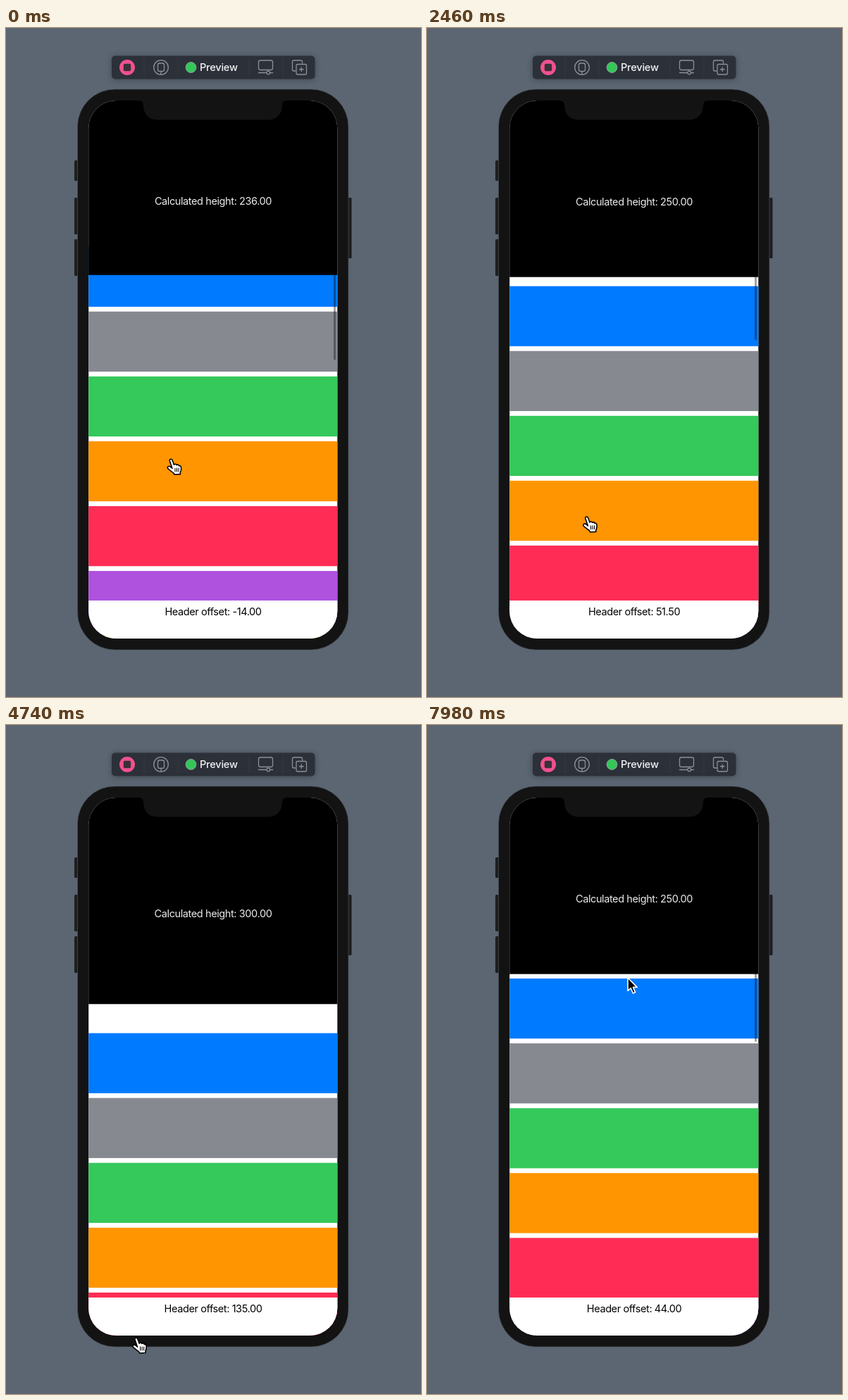
Recreate the animation shown at these times as an HTML page with a canvas. Size 589 px wide and 950 px high, loop 8 s.

```html
<!DOCTYPE html>
<html lang="en">
<head>
<meta charset="utf-8">
<title>Collapsing header</title>
<style>
  html, body { margin: 0; width: 100%; height: 100%; overflow: hidden; background: #5b6672; }
  canvas { display: block; width: 589px; height: 950px; }
</style>
</head>
<body>
<canvas id="stage"></canvas>
<script>
const canvas = document.getElementById('stage');
const ctx = canvas.getContext('2d');
const ratio = window.devicePixelRatio || 1;
canvas.width = 589 * ratio;
canvas.height = 950 * ratio;

const LOOP = 8000, STEP = 60;
const POINT = 764 / 896;               // pixels per device point
const SAFE_TOP = 140.5, FOOTER_TOP = 813, REST = 44;
const COLORS = ['#007aff', '#878991', '#35c85a', '#ff9500', '#ff2d55', '#af52de', '#ffcc00'];
const FONT = 'Inter, Roboto, sans-serif';

// Turning points of the gestures; everything between them is a sine ease
const TURNS = [
  { time: -127, offset: -3, x: 238, y: 632 },
  { time: 1080, offset: -407.5, x: 249, y: 287 },
  { time: 2293, offset: 60, x: 221, y: 709 },
  { time: 2620, offset: REST, x: 240, y: 700 },
  { time: 3363, offset: -260, x: 231, y: 391 },
  { time: 4488, offset: 135, x: 184, y: 854 },
  { time: 5160, offset: 135, x: 200, y: 940 },
  { time: 5600, offset: REST, x: 220, y: 700 },
  { time: 6127, offset: REST, x: 248, y: 400 },
  { time: 6480, offset: 206, x: 252, y: 840 },
  { time: 7140, offset: 206, x: 258, y: 935 },
  { time: 7560, offset: REST, x: 268, y: 700 },
  { time: 7980, offset: REST, x: 285, y: 359 }
];

function valueAt(t, key) {
  const next = TURNS.findIndex(turn => turn.time > t);
  if (next === 0) return TURNS[0][key];
  if (next < 0) return TURNS[TURNS.length - 1][key];
  const a = TURNS[next - 1], b = TURNS[next];
  const ease = (1 - Math.cos(Math.PI * (t - a.time) / (b.time - a.time))) / 2;
  return a[key] + (b[key] - a[key]) * ease;
}

function targetHeight(offset) {
  if (offset > 80) return 300;
  return Math.max(100, 250 + Math.min(0, offset));
}

// The header follows its target with an eased delay
function headerHeight(t) {
  let sum = 0, total = 0;
  for (let s = 0.02; s < 1; s += 0.04) {
    const weight = s * (1 - s);
    sum += weight * targetHeight(valueAt(t - s * 430, 'offset'));
    total += weight;
  }
  return sum / total;
}

function rect(x0, y0, x1, y1, color) {
  ctx.fillStyle = color;
  ctx.fillRect(x0, y0, x1 - x0, y1 - y0);
}

function rounded(x0, y0, x1, y1, radius) {
  ctx.beginPath();
  ctx.roundRect(x0, y0, x1 - x0, y1 - y0, radius);
}

function circle(x, y, r) {
  ctx.beginPath();
  ctx.arc(x, y, r, 0, Math.PI * 2);
}

function fill(color) { ctx.fillStyle = color; ctx.fill(); }

function stroke(color, width) {
  ctx.strokeStyle = color;
  ctx.lineWidth = width;
  ctx.stroke();
}

function text(string, x, y, color, { align = 'center', weight = 400, spacing = -0.4 } = {}) {
  ctx.font = `${weight} 14.5px ${FONT}`;
  ctx.letterSpacing = spacing + 'px';
  ctx.textAlign = align;
  ctx.fillStyle = color;
  ctx.fillText(string, x, y);
}

function drawToolbar() {
  const line = '#8c9098';
  ctx.save();
  ctx.shadowColor = 'rgba(0,0,0,.3)';
  ctx.shadowBlur = 8 * ratio;
  ctx.shadowOffsetY = ratio;
  rounded(150, 39.5, 438.5, 72.5, 5);
  fill('#2c3039');
  ctx.restore();
  for (const x of [196, 244, 345, 393]) rect(x - 0.5, 44, x + 0.5, 68, '#353942');

  circle(172, 56, 11);
  fill('#f1518f');
  rounded(166.8, 50.8, 177.2, 61.2, 2);
  fill('#3a3039');

  circle(220, 56, 10.3);
  stroke(line, 1.3);
  rounded(215.5, 50, 224.5, 61.5, 2.5);
  stroke(line, 1.3);
  ctx.stroke(new Path2D('M220 61.5V66'));

  circle(262.5, 56, 7.4);
  fill('#34c759');
  stroke('#8fa497', 1);
  text('Preview', 275, 61, '#f2f3f5', { align: 'left', weight: 500, spacing: -0.2 });

  rounded(358.5, 46, 378.5, 59.5, 2.5);
  stroke(line, 1.3);
  ctx.stroke(new Path2D('M358 63.5H369.5M375 63.5H379'));
  circle(372.2, 63.5, 2.3);
  stroke(line, 1.3);

  ctx.stroke(new Path2D('M411 61H408.5Q406.5 61 406.5 59V48Q406.5 46 408.5 46H418.5Q420.5 46 420.5 48V50.5'));
  rounded(412, 51.5, 426.5, 66, 2);
  fill('#2c3039');
  stroke(line, 1.3);
  ctx.stroke(new Path2D('M419.25 55.5V62M416 58.75H422.5'));
}

function drawBody() {
  for (const [x, y0, y1] of [[97, 188, 217], [97, 241, 293], [97, 300, 352], [484, 241, 327]]) {
    rounded(x, y0, x + 6.5, y1, 1.5);
    fill('#1d1e1f');
  }
  rounded(101.5, 87, 486, 883, 53);
  fill('#131313');
  stroke('#4d555d', 0.7);
}

function drawScreen(t, frame) {
  const offset = valueAt(t, 'offset');
  const pull = offset - REST;
  const headerBottom = SAFE_TOP + headerHeight(t) * POINT;
  const top = 360 + pull * POINT;

  ctx.save();
  rounded(117.2, 103, 470.3, 867, 39);
  ctx.clip();
  rect(117, 103, 471, 867, '#fff');
  for (let i = 0; i < 14; i++) {
    const y = top + i * 108 * POINT;
    rect(117, y, 471, y + 100 * POINT, COLORS[i % COLORS.length]);
  }

  const barBottom = 450 - pull * (pull > 0 ? POINT : 0.371);
  rounded(465, Math.min(barBottom - 7, Math.max(143, barBottom - 307)), 468, barBottom, 1.5);
  fill('rgba(0,0,0,.36)');

  rect(117, 103, 471, headerBottom, '#000');
  rect(117, FOOTER_TOP, 471, 867, '#fff');

  // Labels are sometimes refreshed a moment after the scroll view
  const stale = frame % 6 === 3 ? 16 : 0;
  const shown = Math.round(valueAt(t - stale, 'offset') * 2) / 2;
  text('Calculated height: ' + targetHeight(shown).toFixed(2), 294,
    (SAFE_TOP + headerBottom) / 2 + 5, '#ededed');
  text('Header offset: ' + shown.toFixed(2), 294, 834, '#000');

  ctx.fillStyle = '#131313';
  ctx.fill(new Path2D('M188 102V103Q195 103 195 110Q196 130.5 217 130.5H370Q391 130.5 392 110Q392 103 399 103V102Z'));
  ctx.restore();
}

const HAND = new Path2D('M-2.4 2.6L-5.9-7.6C-6.7-10.6-3.1-11.5-2.1-8.6L.2-2.4C.8-3.9 3.4-3.6 3.9-2.1C4.9-3.1 7-2.5 7.4-.9C8.7-1.5 10-.4 10.2 1.2C10.7 4.5 10.2 6.5 9 8.4V11L.6 11.4L-.4 9.2C-3.2 7.8-5.4 5.4-8.2 3.2C-10.4 .8-7.6-1.6-5 .4Z');
const PALM = new Path2D('M1.6 2.6L1.8 7.4M4.2 2.4V7.2M6.8 2.4L6.6 7.2');
const ARROW = new Path2D('M0 0V18.4L4.2 14.6L7.4 22L10.6 20.6L7.5 13.4H13.2Z');

function drawPointer(t) {
  const isHand = t < 7500;
  const shape = isHand ? HAND : ARROW;
  ctx.save();
  ctx.translate(valueAt(t, 'x'), valueAt(t, 'y'));
  ctx.lineJoin = ctx.lineCap = 'round';
  ctx.fillStyle = isHand ? '#fff' : '#000';
  ctx.strokeStyle = isHand ? '#000' : '#fff';
  ctx.lineWidth = 1.6;
  ctx.fill(shape);
  ctx.stroke(shape);
  if (isHand) {
    ctx.lineWidth = 1.1;
    ctx.stroke(PALM);
  }
  ctx.restore();
}

function draw(now) {
  const frame = Math.floor((now % LOOP) / STEP);
  const t = frame * STEP;
  ctx.setTransform(ratio, 0, 0, ratio, 0, 0);
  rect(0, 0, 589, 950, '#5b6672');
  drawToolbar();
  drawBody();
  drawScreen(t, frame);
  drawPointer(t);
}

const start = performance.now();
function tick() {
  draw(performance.now() - start);
  requestAnimationFrame(tick);
}
tick();
</script>
</body>
</html>
```
